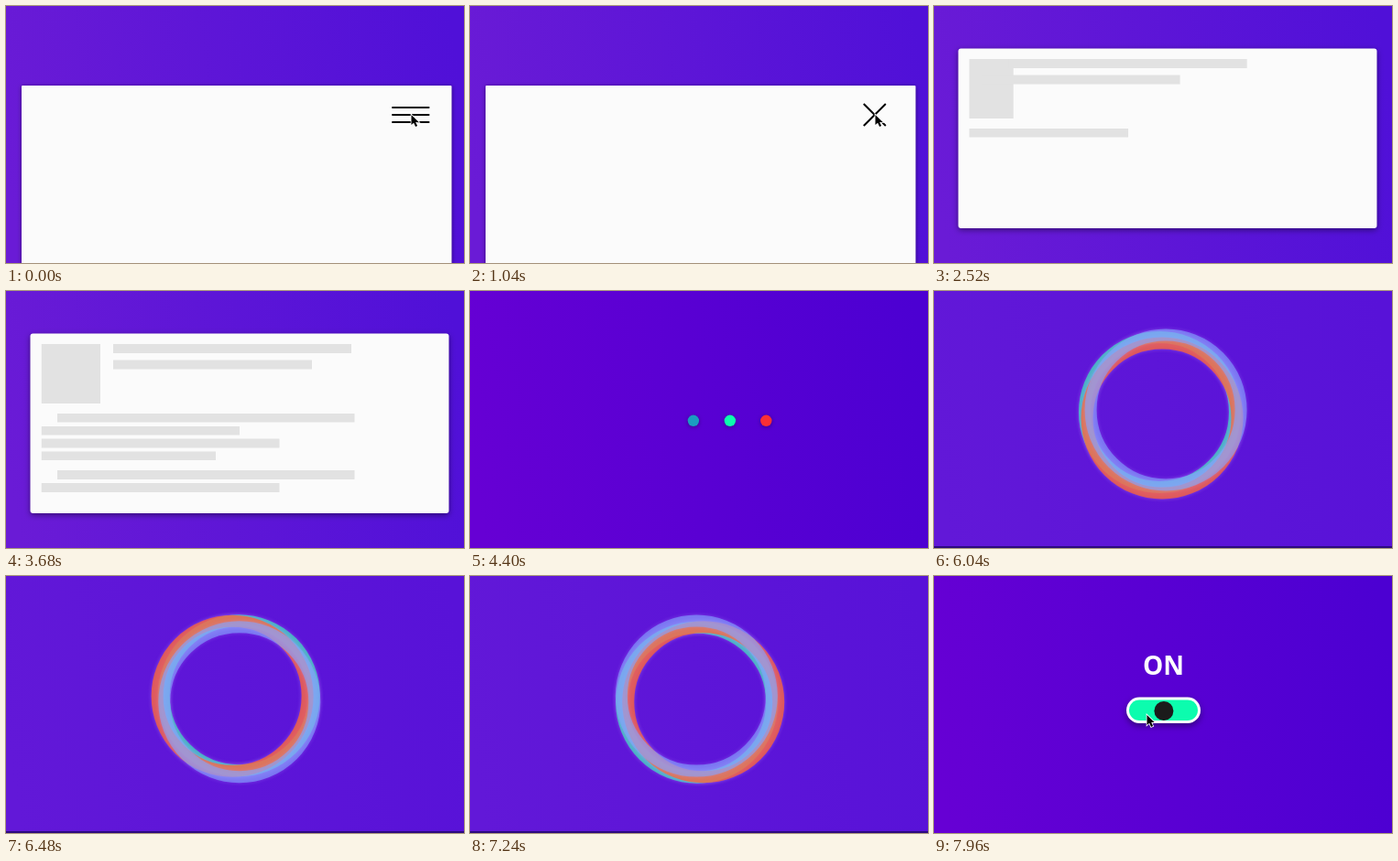
Write an HTML page with a canvas that moves like this. It is 500 px wide and 281 px high and loops after 8000 ms.

```html
<!DOCTYPE html>
<html lang="en">
<head>
<meta charset="utf-8">
<title>Interface motion reel</title>
<style>
html, body { margin: 0; width: 100%; height: 100%; overflow: hidden; background: #5a10d6; }
canvas { display: block; width: 500px; height: 281px; }
</style>
</head>
<body>
<canvas id="stage"></canvas>
<script>
const W = 500, H = 281, LOOP = 8000;
const canvas = document.getElementById('stage');
const ctx = canvas.getContext('2d');
const ratio = window.devicePixelRatio || 1;
canvas.width = Math.round(W * ratio);
canvas.height = Math.round(H * ratio);
ctx.scale(ratio, ratio);

const clamp = v => Math.min(1, Math.max(0, v));
const mix = (a, b, k) => a + (b - a) * k;
const progress = (t, start, duration) => clamp((t - start) / duration);
const easeInOut = k => (1 - Math.cos(Math.PI * k)) / 2;
const easeOutCubic = k => 1 - (1 - k) ** 3;

function background(left, right) {
  const fill = ctx.createLinearGradient(0, H / 2 + 40, W, H / 2 - 40);
  fill.addColorStop(0, left);
  fill.addColorStop(1, right);
  ctx.fillStyle = fill;
  ctx.fillRect(0, 0, W, H);
}

function withShadow(blur, offsetY, alpha, draw) {
  ctx.save();
  ctx.shadowColor = `rgba(0,0,0,${alpha})`;
  ctx.shadowBlur = blur * ratio;
  ctx.shadowOffsetY = offsetY * ratio;
  draw();
  ctx.restore();
}

function box(x, y, w, h, radius, color) {
  ctx.fillStyle = color;
  ctx.beginPath();
  ctx.roundRect(x, y, w, h, radius);
  ctx.fill();
}

function disc(x, y, r, color) {
  ctx.fillStyle = color;
  ctx.beginPath();
  ctx.arc(x, y, r, 0, Math.PI * 2);
  ctx.fill();
}

function cursor(x, y) {
  ctx.save();
  ctx.translate(x, y);
  ctx.beginPath();
  [[0, 0], [0, 11], [2.6, 8.7], [4.6, 13], [6.6, 12.1], [4.7, 8], [8.2, 8]]
    .forEach(p => ctx.lineTo(...p));
  ctx.closePath();
  ctx.lineWidth = 1.6;
  ctx.strokeStyle = '#fff';
  ctx.stroke();
  ctx.fillStyle = '#000';
  ctx.fill();
  ctx.restore();
}

function menuIcon(t) {
  background('#6a1bd6', '#5010d8');
  withShadow(5, 1, 0.45, () => box(17, 87, 469.5, 210, 1, '#fbfbfb'));
  const open = easeInOut(progress(t, 400, 400)) - easeInOut(progress(t, 1200, 400));
  ctx.fillStyle = '#000';
  for (const side of [-1, 0, 1]) {
    const half = side ? mix(20.5, 17, open) : 20.5 * (1 - open);
    ctx.save();
    ctx.translate(441.8, 119 + side * 8 * (1 - open));
    ctx.rotate(-side * open * Math.PI / 4);
    ctx.fillRect(-half, -1, half * 2, 2);
    ctx.restore();
  }
  cursor(442.5, 119);
}

// Each bar: x, y, width, height, stagger slot
const BARS = [
  [38.5, 58, 64.5, 65, 0], [117, 58, 260, 10, 1], [117, 75.5, 217, 10, 2],
  [56, 134, 324.5, 9.5, 4], [38.5, 148, 216.5, 9.5, 5], [38.5, 161.5, 260, 10, 6],
  [38.5, 175.5, 190.5, 9.5, 7], [56, 196, 324.5, 10, 8], [38.5, 210, 260, 10, 9]
];

function skeleton(t) {
  background('#6a1bd6', '#5010d8');
  withShadow(6, 2, 0.45, () => box(26.5, 46.5, 457, 196.5, 3, '#fbfbfb'));
  ctx.save();
  ctx.beginPath();
  ctx.rect(38.5, 46, 445, 197);
  ctx.clip();
  ctx.fillStyle = '#e2e2e2';
  for (const [x, y, w, h, slot] of BARS) {
    const shift = 457 * (1 - easeOutCubic(progress(t, slot * 97, 1000)));
    ctx.fillRect(x - shift, y, w, h);
  }
  ctx.restore();
}

function dots(t) {
  background('#6600d4', '#4c00d2');
  ['#fb2f36', '#0cfcae', '#1a9cc0'].forEach((color, i) => {
    const phase = Math.max(0, t - i * 127) / 1100 * Math.PI;
    const x = 280 - 112 * Math.cos(phase);
    withShadow(4, 1, 0.35, () => disc(x, 141.8, 6.2, color));
  });
}

function rings(t) {
  background('#6218d8', '#5812d8');
  const spin = (t - 530) / 1500 * Math.PI * 2;
  const layers = [
    ['rgba(60,220,190,.75)', -50], ['rgba(255,100,50,.75)', -141], ['rgba(130,165,255,.6)', 40]
  ];
  ctx.lineWidth = 13;
  for (const [color, degrees] of layers) {
    const angle = degrees * Math.PI / 180 + spin;
    ctx.save();
    ctx.shadowColor = 'rgba(190,150,255,.5)';
    ctx.shadowBlur = 4 * ratio;
    ctx.strokeStyle = color;
    ctx.beginPath();
    ctx.arc(251 + 5 * Math.cos(angle), 134.5 + 5 * Math.sin(angle), 82, 0, Math.PI * 2);
    ctx.stroke();
    ctx.restore();
  }
  ctx.fillStyle = '#2c0a80';
  ctx.fillRect(0, 279, W, 2);
}

function toggle(t) {
  background('#6600d4', '#4c00d2');
  const on = t >= 240;
  ctx.fillStyle = '#fff';
  ctx.font = '700 28px "Open Sans", "Noto Sans", sans-serif';
  ctx.textAlign = 'center';
  ctx.fillText(on ? 'ON' : 'OFF', 250.5, 108);
  withShadow(7, 3, 0.4, () => box(210, 132.5, 81, 28.5, 14.25, '#fff'));
  box(213, 135.5, 75, 22.5, 11.25, on ? '#0cfcae' : '#fb2f36');
  const x = mix(225, 276, easeInOut(progress(t, 240, 200)));
  disc(x, 147.5, 10.5, '#1b1b1b');
  cursor(232.5, 152);
}

const SCENES = [[0, menuIcon], [1850, skeleton], [3712, dots], [5950, rings], [7620, toggle]];

function render(now) {
  const t = now % LOOP;
  const [start, draw] = SCENES.findLast(scene => scene[0] <= t);
  draw(t - start);
}

const began = performance.now();
function tick() {
  render(performance.now() - began);
  requestAnimationFrame(tick);
}
tick();
</script>
</body>
</html>
```
